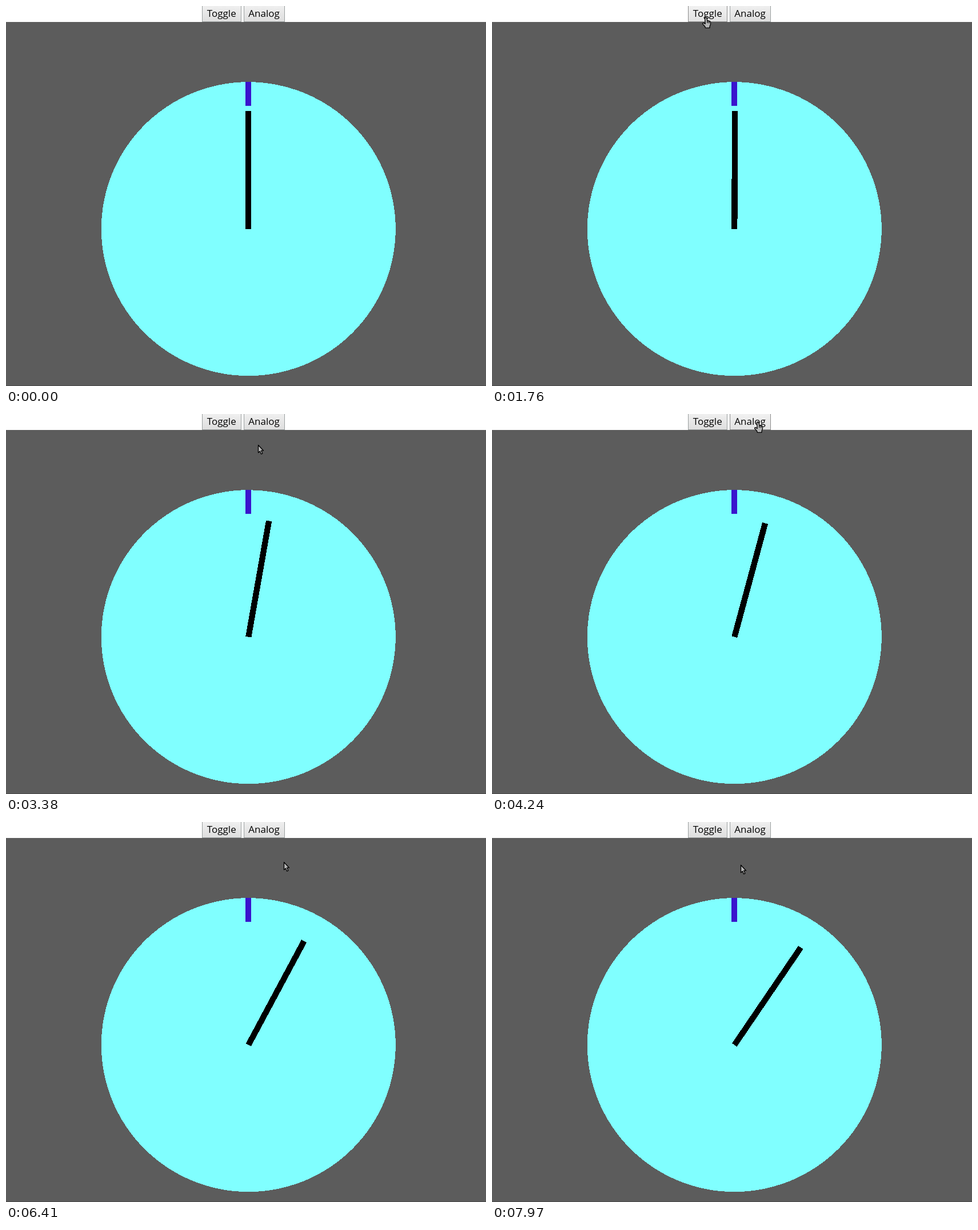
An HTML page for the animation above (8000 ms loop, 840 by 666 pixels).

```html
<!DOCTYPE html>
<html lang="en">
<head>
<meta charset="utf-8">
<title>Clock</title>
<style>
html, body { margin: 0; width: 100%; height: 100%; overflow: hidden; background: #fff; }
svg { display: block; width: 840px; height: 666px; }
text { font: 17px "Open Sans", "Noto Sans", sans-serif; fill: #000; text-anchor: middle; }
.crisp { shape-rendering: crispEdges; }
</style>
</head>
<body>
<svg viewBox="0 0 840 666">
  <defs>
    <linearGradient id="up" x2="0" y2="1"><stop stop-color="#f1f1f1"/><stop offset="1" stop-color="#dedede"/></linearGradient>
    <linearGradient id="over" x2="0" y2="1"><stop stop-color="#f3f3f3"/><stop offset="1" stop-color="#e2e2e2"/></linearGradient>
    <linearGradient id="down" x2="0" y2="1"><stop stop-color="#e7e7e7"/><stop offset="1" stop-color="#d4d4d4"/></linearGradient>
  </defs>
  <rect width="840" height="666" fill="#fff"/>
  <g class="crisp">
    <rect y="28" width="840" height="638" fill="#5c5c5c"/>
    <rect y="665" width="840" height="1" fill="#4a4a4a"/>
    <circle cx="424.3" cy="390.7" r="257.5" fill="#80ffff"/>
    <rect x="419" y="133" width="10.4" height="42" fill="#3a14cd"/>
    <rect id="hand" x="-5.15" y="-206.4" width="10.3" height="206.4"/>
  </g>
  <rect id="toggle" x="343.5" y="-3.5" width="68" height="31"/>
  <rect id="analog" x="416.5" y="-3.5" width="71" height="31"/>
  <text x="377.2" y="19">Toggle</text>
  <text x="451.6" y="19">Analog</text>
  <g id="cursor" fill="#b4b4b4" stroke="#000" stroke-width="1.3" stroke-linejoin="round">
    <path id="arrow" d="M.5 .5V13.8L3.4 11.2 5.6 16.2 7.9 15.2 5.7 10.2H9.6Z"/>
    <g id="finger">
      <path d="M-2.5 1Q-1-1 .8 1L2 6.3Q3.6 5 4.8 6.7 6.5 6 7.4 8 8.2 12 6.2 15.2L5.8 18.4H-1.6L-2.4 15.8 -6.3 11.6Q-6.8 9.3-4.5 9.6L-1.8 11.4Z"/>
      <path d="M2 6.3V10M4.8 6.9V10.2" fill="none"/>
    </g>
  </g>
</svg>
<script>
const LOOP = 8000, START = 1720, STEPPED = 4390, TICK = 1010, FRAME = 77.4;
const el = id => document.getElementById(id);
const smooth = p => p * p * (3 - 2 * p);
const easeOut = p => 1 - (1 - p) ** 2;

// first and last update in ms, number of updates, end point, easing
const moves = [
  [70, 670, 9, 369, 93, easeOut],
  [820, 1450, 9, 368, 9, smooth],
  [1590, 1590, 1, 377, 14, smooth],
  [1760, 1760, 1, 375, 20, smooth],
  [1840, 2300, 7, 441, 54, smooth],
  [3850, 4240, 6, 466, 14, smooth],
  [4640, 4780, 3, 486, 70, smooth],
  [6640, 7120, 7, 376, 14, smooth],
  [7570, 7970, 6, 435, 75, smooth]
];
const buttons = [
  { node: el("toggle"), left: 343, right: 412, presses: [[1590, 1760], [7270, 7420]] },
  { node: el("analog"), left: 416, right: 488, presses: [[4310, 4390]] }
];

function pointer(t) {
  let x = 811, y = 707;
  for (const [from, to, steps, endX, endY, ease] of moves) {
    if (t < from) break;
    const pace = (to - from) / (steps - 1) || 1;
    const p = ease(Math.min(1, (Math.floor((t - from) / pace + 0.05) + 1) / steps));
    x += (endX - x) * p;
    y += (endY - y) * p;
  }
  return [Math.round(x), Math.round(y)];
}

function angle(t) {
  if (t < 1760) return 0;
  const at = t < STEPPED
    ? 1760 + Math.floor((t - 1742) / FRAME) * FRAME
    : STEPPED + Math.floor((t - STEPPED) / TICK) * TICK;
  return (at - START) * 0.006;
}

function draw(t) {
  el("hand").setAttribute("transform", `translate(424.3 390.7) rotate(${angle(t)})`);
  const [x, y] = pointer(t);
  let hovering = false;
  for (const b of buttons) {
    const over = y < 28 && x >= b.left && x < b.right;
    const pressed = b.presses.some(([from, to]) => t >= from && t < to);
    hovering = hovering || over;
    b.node.setAttribute("fill", `url(#${pressed ? "down" : over ? "over" : "up"})`);
    b.node.setAttribute("stroke", over ? "#8c8c8c" : "#9a9f9f");
  }
  el("cursor").setAttribute("transform", `translate(${x} ${y})`);
  el("arrow").style.display = hovering ? "none" : "";
  el("finger").style.display = hovering ? "" : "none";
}

const begin = performance.now();
function loop() {
  draw((performance.now() - begin) % LOOP);
  requestAnimationFrame(loop);
}
draw(0);
requestAnimationFrame(loop);
</script>
</body>
</html>
```
